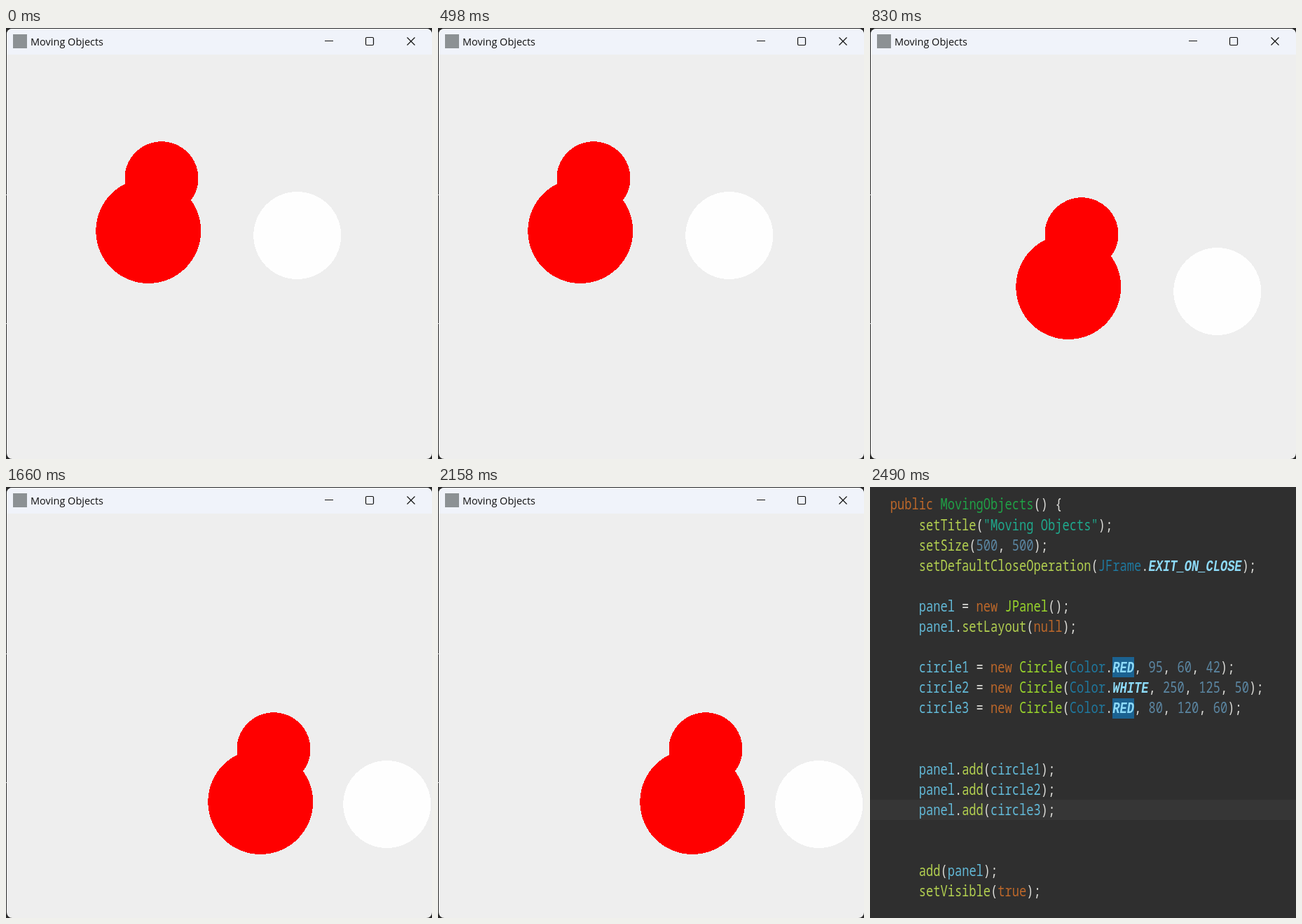
Write an HTML page that moves like this. It is 608x616 px and loops after 3320 ms.

```html
<!DOCTYPE html>
<html lang="en">
<head>
<meta charset="utf-8">
<title>Moving Objects</title>
<style>
  html, body { margin: 0; width: 100%; height: 100%; overflow: hidden; background: #2a2a2a; }
  svg { display: block; }
  .title { font: 14.5px "Open Sans", "Noto Sans", sans-serif; fill: #101010; }
  .code { font: 17.08px "Noto Sans Mono", "DejaVu Sans Mono", monospace; fill: #dcdcd8; white-space: pre; }
  .string { fill: #1fa88c; }
  .keyword { fill: #bb672a; }
  .constant { fill: #8ddaf8; font: italic bold 17.08px "Liberation Mono", monospace; }
  .constructor { fill: #20a046; }
  .type { fill: #1f789e; }
  .field { fill: #62b8d6; }
  .number { fill: #5b86a2; }
  .created { fill: #98d32c; }
  .method { fill: #b2cf50; }
</style>
</head>
<body>
<svg width="608" height="616" viewBox="0 0 608 616">
  <g id="app">
    <rect width="608" height="616" fill="#2a2a2a"/>
    <rect x="1" y="1" width="607" height="615" rx="8" fill="#eee"/>
    <path d="M1 38V9a8 8 0 0 1 8-8h591a8 8 0 0 1 8 8v29z" fill="#f0f3fa"/>
    <path d="M0 238.5h1M0 422.5h1" stroke="#ddd"/>
    <rect x="10" y="9" width="20" height="20" fill="#8c9194"/>
    <text class="title" x="35" y="25">Moving Objects</text>
    <g fill="none" stroke="#111" stroke-width="1.2">
      <path d="M455 18.5h12M572.5 13.5l11 11m0-11l-11 11"/>
      <rect x="513.5" y="13.5" width="11" height="11" rx="1.5"/>
    </g>
    <g id="reds" fill="#f00" shape-rendering="crispEdges">
      <circle cx="222" cy="214.75" r="52.5"/>
      <circle cx="203.25" cy="290" r="75"/>
    </g>
    <circle id="white" r="62.5" fill="#fefefe" shape-rendering="crispEdges"/>
  </g>
  <g id="editor"></g>
</svg>
<script>
const STEP = 830, LEFT = 28.7, ADVANCE = 10.25, LINE = 29.1, BASE = 32.5, TALL = 1.3;
const [app, reds, white, editor] =
  ["app", "reds", "white", "editor"].map(id => document.getElementById(id));

const source = `public MovingObjects() {
    setTitle("Moving Objects");
    setSize(500, 500);
    setDefaultCloseOperation(JFrame.EXIT_ON_CLOSE);

    panel = new JPanel();
    panel.setLayout(null);

    circle1 = new Circle(Color.RED, 95, 60, 42);
    circle2 = new Circle(Color.WHITE, 250, 125, 50);
    circle3 = new Circle(Color.RED, 80, 120, 60);


    panel.add(circle1);
    panel.add(circle2);
    panel.add(circle3);


    add(panel);
    setVisible(true);`.split("\n");

const kinds = ["string", "keyword", "constant", "constructor", "type", "field", "number", "created", "method"];
const token = /("[^"]*")|\b(public|new|null|true)\b|\b(RED|WHITE|EXIT_ON_CLOSE)\b|(MovingObjects)|(Color|JFrame)|(panel|circle\d)|(\d+)|(JPanel|Circle)|([A-Za-z]+)/g;

const colour = line => line.replace(token, (word, ...groups) =>
  `<tspan class="${kinds[groups.findIndex(Boolean)]}">${word}</tspan>`);
const band = (row, x, width, fill) =>
  `<rect x="${x}" y="${BASE + row * LINE - 22}" width="${width}" height="${LINE}" fill="${fill}" shape-rendering="crispEdges"/>`;

editor.innerHTML = '<rect width="608" height="616" fill="#2f2f2f"/>' +
  band(15, 0, 608, "#363636") +
  source.map((line, row) => {
    const column = line.indexOf("RED");
    return (column < 0 ? "" : band(row, LEFT + column * ADVANCE, 3 * ADVANCE, "#1b6291")) +
      `<text class="code" x="${LEFT}" y="${(BASE + row * LINE) / TALL}" transform="scale(1 ${TALL})">${colour(line)}</text>`;
  }).join("");

// The balls jump diagonally; the white one stops at the right wall.
function draw() {
  const step = Math.floor(performance.now() / STEP) % 4;
  const coding = step === 3;
  app.style.display = coding ? "none" : "";
  editor.style.display = coding ? "" : "none";
  const shift = step * 80;
  reds.setAttribute("transform", `translate(${shift} ${shift})`);
  white.setAttribute("cx", Math.min(415.75 + shift, 543.75));
  white.setAttribute("cy", Math.min(296.5 + shift, 453.5));
  requestAnimationFrame(draw);
}
draw();
</script>
</body>
</html>
```
